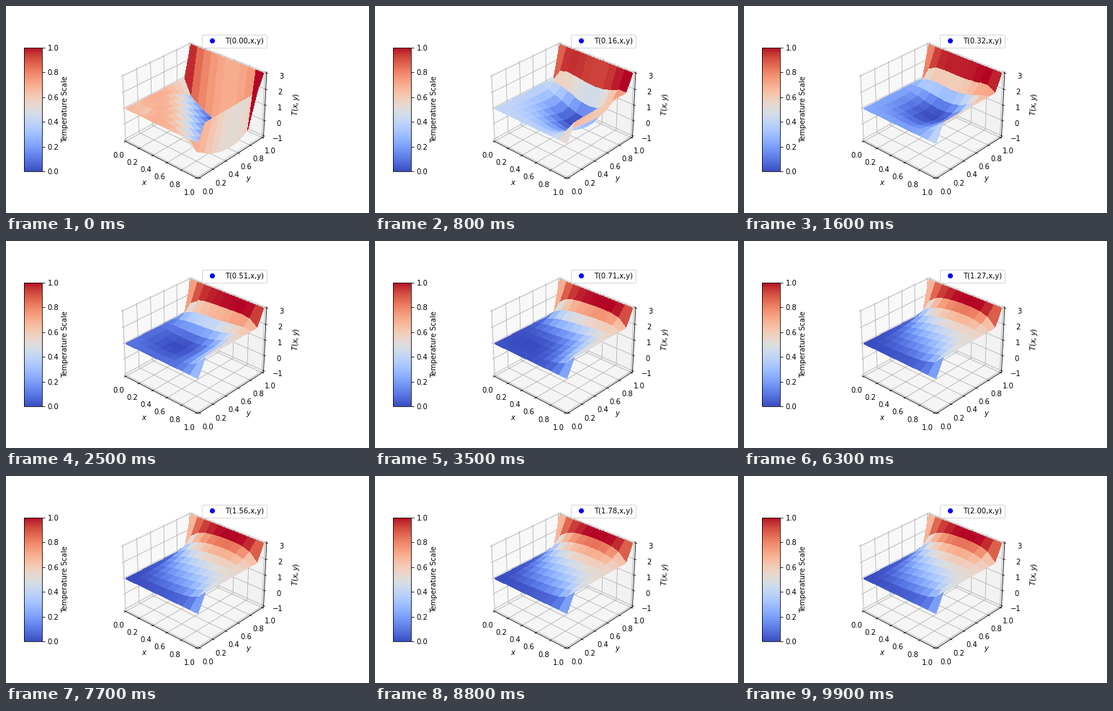
Recreate the animation shown at these times as a matplotlib script. Size 504x288 px, loop 10000 ms.

```python
import numpy as np
import matplotlib.pyplot as plt
from matplotlib.animation import FuncAnimation
from matplotlib.cm import ScalarMappable
from matplotlib.lines import Line2D

FRAMES, INTERVAL = 100, 100
N, SUBSTEPS, ALPHA = 11, 10, 0.12

plt.rcParams["axes3d.automargin"] = True
plt.rcParams["figure.subplot.bottom"] = 0.125

axis = np.linspace(0, 1, N)
X, Y = np.meshgrid(axis, axis)
times = np.linspace(0, 2, FRAMES)


def apply_walls(T):
    T[:, 0] = 1
    T[:, -1] = 2
    T[0, :] = 1
    T[-1, :] = 3
    return T


def solve_heat():
    """Explicit finite differences; one temperature field per time."""
    r = ALPHA * (times[1] / SUBSTEPS) * (N - 1) ** 2
    T = apply_walls(np.sin(np.pi * (X + Y)))
    fields = [T.copy()]
    for _ in times[1:]:
        for _ in range(SUBSTEPS):
            T[1:-1, 1:-1] += r * (T[2:, 1:-1] + T[:-2, 1:-1] + T[1:-1, 2:]
                                  + T[1:-1, :-2] - 4 * T[1:-1, 1:-1])
        fields.append(T.copy())
    return fields


fields = solve_heat()

fig = plt.figure(figsize=(7, 4), dpi=72)
ax = fig.add_subplot(projection="3d")
ax.view_init(30, -48)
ax.set(xlim=(0, 1), ylim=(0, 1), zlim=(-1, 3))
ax.set_xlabel("$x$")
ax.set_ylabel("$y$")
ax.set_zlabel("$T(x,y)$")
ax.set_zticks(range(-1, 4))

bar_ax = fig.add_axes([0.05, 0.2, 0.05, 0.6])
fig.colorbar(ScalarMappable(cmap="coolwarm"), cax=bar_ax,
             label="Temperature Scale")

dot = Line2D([], [], color="b", marker="o", linestyle="none")
legend = ax.legend([dot], ["T(0.00,x,y)"], loc="upper right")
surface = None


def update(i):
    global surface
    if surface is not None:
        surface.remove()
    surface = ax.plot_surface(X, Y, fields[i], cmap="coolwarm",
                              linewidth=0, antialiased=False)
    ax.set(xlim=(0, 1), ylim=(0, 1), zlim=(-1, 3))
    legend.get_texts()[0].set_text(f"T({times[i]:.2f},x,y)")
    return [surface]


anim = FuncAnimation(fig, update, frames=FRAMES, interval=INTERVAL,
                     init_func=lambda: update(0), repeat=True)
plt.show()
```
